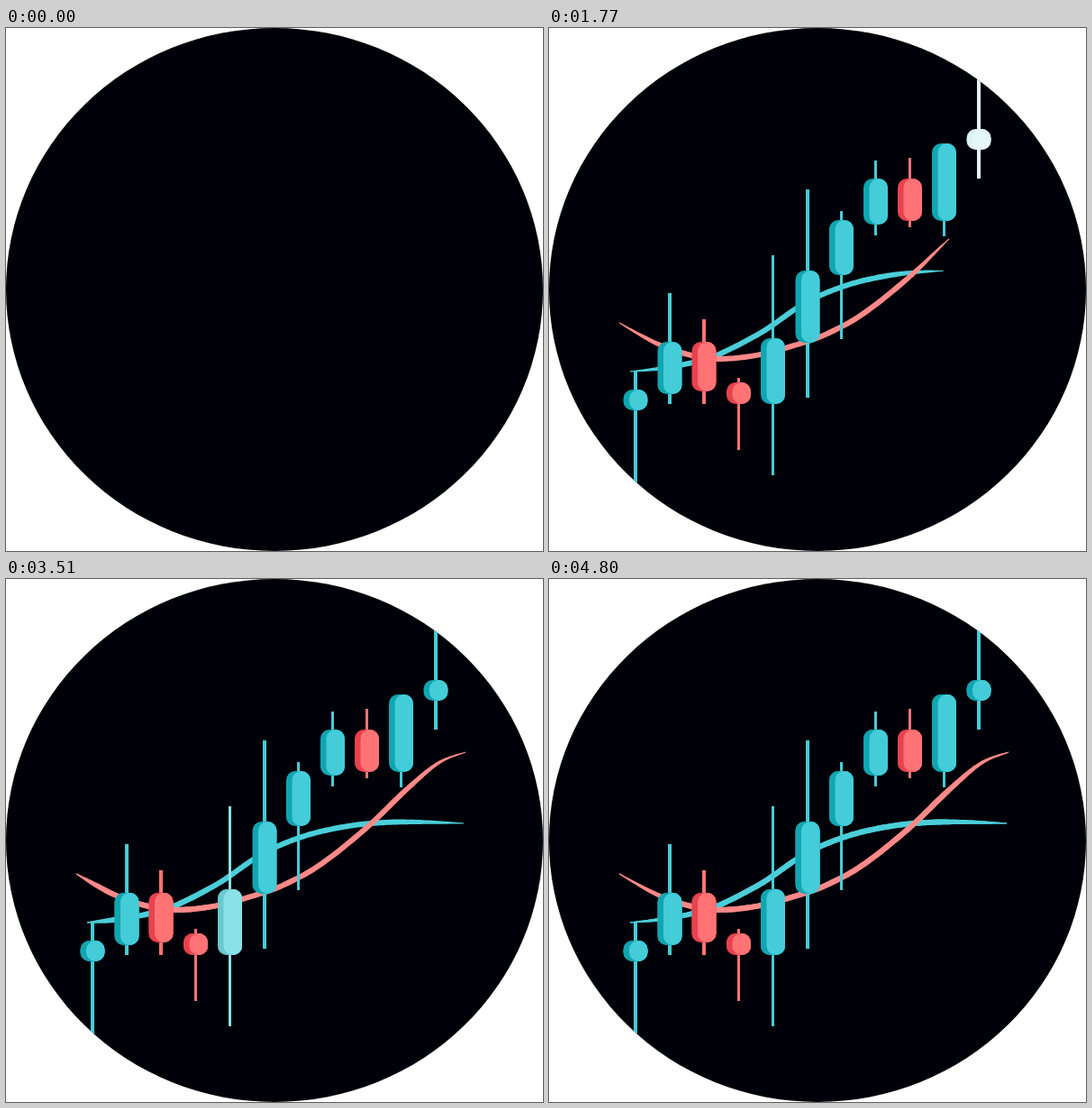
An HTML page with a canvas that plays this animation: 596 by 580 pixels, repeating every 5400 ms.

```html
<!DOCTYPE html>
<html>
<head>
<meta charset="utf-8">
<style>
html, body { margin: 0; width: 100%; height: 100%; overflow: hidden; background: #fff; }
canvas { display: block; }
</style>
</head>
<body>
<canvas id="stage" width="596" height="580"></canvas>
<script>
const ctx = document.getElementById('stage').getContext('2d');
const LOOP = 5400, PASS = 2700, STEP = 30;
const START = 30, GAP = 172, FADE = 170, DRAW = 2070;

const UP = { front: [69, 204, 217], side: [16, 166, 177] };
const DOWN = { front: [255, 115, 117], side: [232, 66, 78] };

// center x, wick top, body top, body bottom, wick bottom, wick width, colours
const candles = [
  [96, 381, 401, 424, 520, 4, UP],
  [134, 294, 348, 406, 417, 4, UP],
  [172, 323, 348, 403, 417, 4, DOWN],
  [210.5, 388, 393, 417, 468, 3, DOWN],
  [248.5, 252, 344, 417, 496, 3, UP],
  [287, 179, 269, 349, 410, 4, UP],
  [324.5, 203, 213, 274, 345, 3, UP],
  [362.5, 147, 167, 218, 230, 3, UP],
  [400.5, 144, 167, 214, 221, 3, DOWN],
  [438.5, 130, 128, 214, 231, 3, UP],
  [477, 40, 112, 135, 167, 4, UP]
];

const curves = [
  { color: '#4bced9', path: smooth([[90, 381], [120, 378], [155, 372], [186, 363], [235, 338],
    [273, 312], [300, 297], [338, 283], [380, 274], [420, 270], [460, 269.5], [508, 271]]) },
  { color: '#ff8988', path: smooth([[78, 327], [120, 350], [158, 363], [190, 367], [235, 362],
    [285, 348], [313, 337], [350, 316], [400, 276], [445, 233], [480, 204], [510, 192]]) }
];

// Catmull-Rom samples as [x, y, distance along the curve]
function smooth(pts) {
  const out = [];
  let dist = 0;
  for (let i = 0; i < pts.length - 1; i++) {
    const [a, b, c, d] = [-1, 0, 1, 2].map(k => pts[Math.min(pts.length - 1, Math.max(0, i + k))]);
    for (let j = i ? 1 : 0; j <= 16; j++) {
      const u = j / 16;
      const [x, y] = [0, 1].map(n => b[n] + u / 2 * (c[n] - a[n]
        + u * (2 * a[n] - 5 * b[n] + 4 * c[n] - d[n] + u * (3 * (b[n] - c[n]) + d[n] - a[n]))));
      const last = out[out.length - 1];
      if (last) dist += Math.hypot(x - last[0], y - last[1]);
      out.push([x, y, dist]);
    }
  }
  return out;
}

function drawCurve({ color, path }, part) {
  const len = path[path.length - 1][2] * part;
  if (len <= 0) return;
  const pts = path.filter(p => p[2] < len);
  const next = path[pts.length], prev = pts[pts.length - 1];
  if (next) {
    const k = (len - prev[2]) / (next[2] - prev[2]);
    pts.push(prev.map((v, n) => v + (next[n] - v) * k));
  }
  const left = [], right = [];
  pts.forEach(([x, y, s], i) => {
    const a = pts[Math.max(0, i - 1)], b = pts[Math.min(pts.length - 1, i + 1)];
    const angle = Math.atan2(b[1] - a[1], b[0] - a[0]);
    const taper = Math.min(1, s / len / 0.2, (len - s) / len / 0.2);
    const half = 0.5 + 2.5 * Math.sin(Math.max(0, taper) * Math.PI / 2);
    const dx = -Math.sin(angle) * half, dy = Math.cos(angle) * half;
    left.push([x + dx, y + dy]);
    right.unshift([x - dx, y - dy]);
  });
  ctx.fillStyle = color;
  ctx.beginPath();
  left.concat(right).forEach(p => ctx.lineTo(...p));
  ctx.fill();
}

function drawCandle([x, wickTop, top, bottom, wickBottom, wick, tone], age) {
  const white = Math.pow(Math.max(0, 1 - age / FADE), 1.25);
  const tint = c => `rgb(${c.map(v => Math.round(v + (255 - v) * white))})`;
  const body = (x0, w, color) => {
    ctx.fillStyle = tint(color);
    ctx.beginPath();
    ctx.roundRect(x0, top, w, bottom - top, 10);
    ctx.fill();
  };
  ctx.fillStyle = tint(tone.front);
  ctx.fillRect(x - wick / 2, wickTop, wick, wickBottom - wickTop);
  body(x - 13.5, 27, tone.side);
  body(x - 7, 20.5, tone.front);
}

function drawPass(t) {
  const part = Math.min(1, Math.max(0, (t - START) / DRAW));
  const age = i => t - START - i * GAP;
  // a flashing candle stays under the lines until it settles
  const layer = test => candles.forEach((c, i) => test(age(i)) && drawCandle(c, age(i)));
  layer(a => a >= 0 && a < FADE / 2);
  curves.forEach(c => drawCurve(c, part));
  layer(a => a >= FADE / 2);
}

function frame(now) {
  const t = Math.floor(now % LOOP / STEP) * STEP;
  ctx.fillStyle = '#fff';
  ctx.fillRect(0, 0, 596, 580);
  ctx.save();
  ctx.beginPath();
  ctx.ellipse(298, 290, 298, 290, 0, 0, Math.PI * 2);
  ctx.fillStyle = '#000008';
  ctx.fill();
  ctx.clip();
  if (t >= PASS) drawPass(PASS);
  drawPass(t % PASS);
  ctx.restore();
}

const begin = performance.now();
function tick() {
  frame(performance.now() - begin);
  requestAnimationFrame(tick);
}
tick();
</script>
</body>
</html>
```
